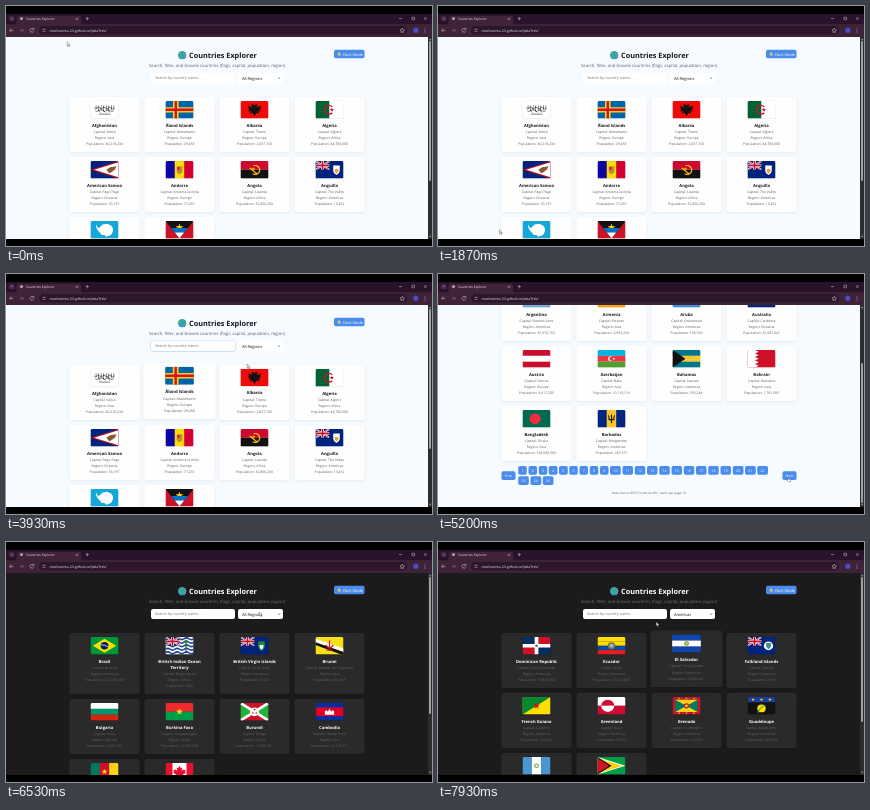
Recreate the animation shown at these times as an HTML page. Size 426 by 240 pixels, loop 8 s.

```html
<!DOCTYPE html>
<html lang="en">
<head>
<meta charset="utf-8">
<title>Countries Explorer</title>
<style>
html, body { margin: 0; width: 100%; height: 100%; overflow: hidden; background: #000; }
body { position: relative; font-family: "Open Sans", "Noto Sans", sans-serif; text-rendering: geometricPrecision; }
svg { display: block; }
#chrome { position: absolute; left: 0; top: 0; }
#view {
  --d: 0%;
  --bg: color-mix(in srgb, #1b1b1b var(--d), #f5fbff);
  --card: color-mix(in srgb, #2a2a2a var(--d), #fefefe);
  --head: color-mix(in srgb, #fff var(--d), #151a20);
  --sub: color-mix(in srgb, #747474 var(--d), #5a6068);
  --dim: color-mix(in srgb, #656565 var(--d), #606060);
  position: absolute; left: 0; top: 31px; width: 426px; height: 202px; overflow: hidden; background: var(--bg);
}
/* The page is laid out at four times its shown size */
#doc { position: absolute; left: 0; top: -.6px; width: 1688px; transform-origin: 0 0; }
#doc > * { position: absolute; white-space: nowrap; }
h1 { left: 732px; top: 52px; margin: 0; font-size: 29.2px; line-height: 48px; color: var(--head); }
.sub { left: 0; width: 1688px; top: 104px; text-align: center; font-size: 17px; line-height: 24px; color: var(--sub); }
.globe { left: 688px; top: 60px; }
.field { box-sizing: border-box; top: 148px; height: 40px; border-radius: 8px; background: #fff;
  padding-left: 16px; font-size: 15.2px; line-height: 40px; color: #757575; }
#search { left: 580px; width: 336px; }
#search.focus { box-shadow: 0 0 0 1.500px #a9d0f5, 0 0 8px #c4e0fa; }
#select { left: 928px; width: 180px; font-size: 16px; font-weight: 500; color: #111; }
#select svg { position: absolute; right: 10px; top: 16px; }
#mode { left: 1312px; top: 55px; width: 122px; height: 34px; border-radius: 7px; background: #4a8cf0; color: #fff;
  font-size: 15.5px; line-height: 34px; text-indent: 36px; }
#mode svg { position: absolute; left: 15px; top: 10px; }
.list { left: 254px; top: 244px; width: 1180px; visibility: hidden; }
.list.on { visibility: visible; }
.grid { display: grid; grid-template-columns: repeat(4, 280px); gap: 20px; }
.card { box-sizing: border-box; padding: 16px 28px 20px; border-radius: 11px; background: var(--card); text-align: center;
  white-space: normal; box-shadow: 0 4px 15px rgba(0, 0, 0, .08); }
.card svg { width: 112px; height: 70px; margin: 0 auto 14px; border-radius: 6px; overflow: hidden; box-shadow: 0 1px 4px rgba(0, 0, 0, .2); }
h3 { margin: 0 0 4px; font-size: 16.6px; line-height: 24px; color: var(--head); }
p { margin: 0 -24px; font-size: 13.8px; line-height: 24px; color: var(--dim); white-space: nowrap; }
.pager { display: flex; justify-content: center; align-items: center; gap: 11px; margin-top: 20px; }
.nums { display: flex; flex-wrap: wrap; gap: 6px 6.6px; }
.pager b { flex: none; box-sizing: border-box; height: 35px; padding: 0 13px; border-radius: 7px; background: #4a8cf0; color: #fff;
  font-size: 14.4px; font-weight: 400; line-height: 35px; text-align: center; }
.pager > b { width: 56px; padding: 0; }
.pager b.off { background: #6d7482; color: #9aa0aa; }
.foot { margin-top: 20px; text-align: center; font-size: 12.2px; line-height: 24px; color: var(--dim); }
#bar { position: absolute; right: 0; top: 0; width: 4.4px; height: 202px; background: #2c2c2c; }
#thumb { position: absolute; left: 1px; width: 2.4px; border-radius: 1.2px; background: #9f9f9f; }
#bar svg { position: absolute; left: 0; top: 0; }
#cursor { position: absolute; left: 0; top: 0; overflow: visible; }
</style>
</head>
<body>
<svg id="chrome" width="426" height="31" font-size="3.6" fill="none" stroke="#d8c9d5" stroke-width=".5">
  <g stroke="none">
    <path fill="#28132a" d="M0 8h426v23H0z"/>
    <path fill="#3f2439" d="M0 18.3h426V31H0zM9 18.3q1.5 0 1.5-1.5v-5q0-2 2-2h60.500q2 0 2 2v5q0 1.500 1.500 1.500z"/>
    <rect x="33" y="20" width="368" height="8.600" rx="4.300" fill="#2b1729"/>
    <rect x="3" y="9.800" width="5.500" height="5.500" rx="1.600" fill="#47284a"/>
    <circle cx="15.500" cy="12.600" r="1.600" fill="#a9a0a8"/>
    <circle cx="409.800" cy="24.300" r="2.600" fill="#4c50c8"/>
    <g fill="#eee2ec">
      <text x="20" y="13.800" font-size="3.300">Countries Explorer</text>
      <text x="43.500" y="25.600">marloventa-23.github.io/JobaTrek/</text>
      <circle cx="419" cy="22.600" r=".45"/><circle cx="419" cy="24.300" r=".45"/><circle cx="419" cy="26" r=".45"/>
    </g>
  </g>
  <path d="M4.800 12l1 1 1-1M70 11.700l2.200 2.200m0-2.200l-2.200 2.200M79.600 12.600h3.400m-1.700-1.700v3.400M393 12.600h3M406 11.300h2.500v2.500H406zM418 11.200l2.700 2.700m0-2.700l-2.700 2.700"/>
  <path d="M7.500 24.300H3.700l1.700-1.700m-1.700 1.700l1.700 1.700M27.600 23.300a1.900 1.900 0 1 0 .2 1.600m0-3v1.500h-1.500M36.500 23.300h3.200m-3.200 2h3.200M396.300 22.200l.7 1.500 1.600.2-1.200 1.100.3 1.600-1.400-.8-1.400.8.300-1.600-1.200-1.100 1.600-.2z"/>
  <path stroke="#927f90" d="M13.500 24.300h3.800l-1.700-1.700m1.700 1.700l-1.700 1.700"/>
</svg>
<div id="view">
  <div id="doc">
    <svg class="globe" width="34" height="34" viewBox="0 0 20 20"><circle cx="10" cy="10" r="10" fill="#2f9be0"/><path fill="#4fae57" d="M2 5q4-5 9-4l-1 4-4 2 1 4 3 2-2 5q-3-1-3-5L1 9zM13 7l5-2q3 5 0 10l-3-1-1-3-2-1z"/></svg>
    <h1>Countries Explorer</h1>
    <div class="sub">Search, filter, and browse countries (flags, capital, population, region)</div>
    <div id="mode"><svg width="14" height="14" viewBox="0 0 10 10"><path fill="#ffd34d" d="M6 0a5 5 0 1 0 4 7A5 5 0 0 1 6 0z"/></svg>Dark Mode</div>
    <div id="search" class="field">Search by country name...</div>
    <div id="select" class="field"><span></span><svg width="12" height="9"><path d="M2 2l4 4 4-4" fill="none" stroke="#111" stroke-width="2.400"/></svg></div>
  </div>
  <div id="bar"><svg width="4.400" height="202"><path fill="#9f9f9f" d="M1 3.200l1.200-1.800 1.200 1.800zM1 198.800l1.200 1.800 1.200-1.800z"/></svg><div id="thumb"></div></div>
</div>
<svg id="cursor" width="6" height="8" stroke="#333" stroke-width=".4" fill="#fff" stroke-linejoin="round">
  <path id="arrow" d="M0 0v4l1-.9.7 1.600.7-.3-.7-1.500h1.300z"/>
  <path id="hand" d="M.7 2.500V.500q.4-.6.800 0V2l1.800.5q.4.200.3.700l-.4 1.600H1.200L-.2 3q.3-.6.900.1z"/>
</svg>
<script>
const $ = id => document.getElementById(id);

// Flag pieces on a 30 x 20 field
const R = (c, x = 0, y = 0, w = 30, h = 20) => `<rect x="${x}" y="${y}" width="${w}" height="${h}" fill="${c}"/>`;
const C = (c, x, y, r) => `<circle cx="${x}" cy="${y}" r="${r}" fill="${c}"/>`;
const P = (c, d) => `<path fill="${c}" d="${d}"/>`;
const L = (c, w, d) => `<path fill="none" stroke="${c}" stroke-width="${w}" d="${d}"/>`;
const S = (c, x, y, r) => P(c, 'M' + Array.from({ length: 10 }, (_, i) => {
  const a = i * Math.PI / 5, q = i % 2 ? r * .4 : r;
  return (x + q * Math.sin(a)).toFixed(1) + ' ' + (y - q * Math.cos(a)).toFixed(1);
}).join('L') + 'z');
const H = (...cs) => cs.map((c, i) => R(c, 0, i * 20 / cs.length, 30, 20 / cs.length + .05)).join('');
const V = (...cs) => cs.map((c, i) => R(c, i * 30 / cs.length, 0, 30 / cs.length + .05, 20)).join('');
const cross = (c, w, x = 15) => L(c, w, `M${x} 0V20M0 10H30`);
const moon = (c, bg, x, y, r) => C(c, x, y, r) + C(bg, x + r * .35, y, r * .8);
const X = 'M0 0L30 20M30 0L0 20';
const uk = `<svg width="15" height="10" viewBox="0 0 30 20">${R('#012169') + L('#fff', 4, X) + L('#c8102e', 1.500, X) + cross('#fff', 6.500) + cross('#c8102e', 3.800)}</svg>`;
const shield = (a, b) => P(a, 'M19 5h7v6q0 3-3.500 5-3.500-2-3.500-5z') + P(b, 'M20.500 9h4v2.500q0 1.500-2 3-2-1.500-2-3z');
const ensign = (c, mark) => R(c) + uk + mark;
const red = '#ce1126', blue = '#00247d', gold = '#fcd116', green = '#0a8a43', white = '#fff', black = '#111';

// name | capital | region | population, with its flag
const countries = [
  ['Afghanistan|Kabul|Asia|40,218,234', R(white) + L(black, .6, 'M4 8q1.500 2 3 0t3 0 3 0 3 0 3 0 3 0 3 0M5 11q2 2 4 0t4 0 4 0 4 0 4 0M6 5v4m2.500-4v6m3-6v5m2.500-5v6m3-6v5m2.500-5v6m3-6v5m2.500-5v5M8 10l3 3m2-3l3 3m2-3l3 3M9 15h12')],
  ['Åland Islands|Mariehamn|Europe|29,458', R('#0064ad') + cross('#ffd300', 6, 11) + cross('#d21034', 2.600, 11)],
  ['Albania|Tirana|Europe|2,837,743', R('#f00a0a') + P(black, 'M15 5l-2-2-2 2 2 1-1 1-4-2 1 3-1 1 2 1-2 2 3-.5-1 3 3-1 2 4 2-4 3 1-1-3 3 .5-2-2 2-1-1-1 1-3-4 2-1-1 2-1-2-2z')],
  ['Algeria|Algiers|Africa|44,700,000', V('#006233', white) + L('#d21034', 1.500, 'M18 6.500a5 5 0 1 0 0 7') + S('#d21034', 17.500, 10, 2.500)],
  ['American Samoa|Pago Pago|Oceania|55,197', R(blue) + P('#bd1021', 'M30 0L0 10 30 20z') + P(white, 'M30 1.500L4 10l26 8.500z') + P('#8a5a2b', 'M17 10l4-3 7-1-2 4-4 3-2 1z')],
  ['Andorra|Andorra la Vella|Europe|77,265', V('#10069f', '#fedd00', '#d50032') + P('#c08a3a', 'M12 6h6v6q0 2-3 3-3-1-3-3z') + R('#d50032', 13, 7, 2, 3)],
  ['Angola|Luanda|Africa|32,866,268', H('#cc092f', black) + L('#ffcb00', 1.300, 'M14 5.500a5 5 0 1 1-1 9M10 8l8 7') + S('#ffcb00', 14, 9, 2)],
  ['Anguilla|The Valley|Americas|13,452', ensign(blue, shield(white, '#f3a033'))],
  ['Antarctica|N/A|Antarctic|1,000', R('#12a9da') + P(white, 'M6 4l2 4 2-1 3-3 5-1 4 2 2 3 0 4-2 4-5 2-2-2-3 0-2-3-2-2-2-4z')],
  ['Antigua and Barbuda|Saint John\'s|Americas|97,928', R(red) + P(black, 'M0 0h30L15 20z') + S(gold, 15, 7.500, 4.500) + P('#0072c6', 'M6 8h18l-4 5.500H10z') + P(white, 'M10 13h10l-5 7z')],
  ['Argentina|Buenos Aires|Americas|45,376,763', H('#74acdf', white, '#74acdf') + C('#f6b40e', 15, 10, 2.200)],
  ['Armenia|Yerevan|Asia|2,963,234', H('#d90012', '#0033a0', '#f2a800')],
  ['Aruba|Oranjestad|Americas|106,766', R('#418fde') + R('#ffd100', 0, 12.500, 30, 1.300) + R('#ffd100', 0, 15.500, 30, 1.300) + S(white, 6, 5, 3.500) + S(red, 6, 5, 2.600)],
  ['Australia|Canberra|Oceania|25,687,041', ensign(blue, S(white, 7.500, 15, 2.500) + S(white, 22, 4, 1.500) + S(white, 19, 9, 1.500) + S(white, 26, 8, 1.500) + S(white, 22, 16, 1.500))],
  ['Austria|Vienna|Europe|8,917,205', H('#c8102e', white, '#c8102e')],
  ['Azerbaijan|Baku|Asia|10,110,116', H('#00b5e2', '#ef3340', '#509e2f') + moon(white, '#ef3340', 14, 10, 2.800) + S(white, 17.500, 10, 1.600)],
  ['Bahamas|Nassau|Americas|393,248', H('#00778b', '#ffc72c', '#00778b') + P(black, 'M0 0l14 10L0 20z')],
  ['Bahrain|Manama|Asia|1,701,583', R(red) + P(white, 'M0 0h8l4 2-4 2 4 2-4 2 4 2-4 2 4 2-4 2 4 2-4 2H0z')],
  ['Bangladesh|Dhaka|Asia|164,689,383', R('#006a4e') + C('#f42a41', 13.500, 10, 6)],
  ['Barbados|Bridgetown|Americas|287,371', V('#00267f', '#ffc726', '#00267f') + L(black, 1.200, 'M15 5v10M11.500 6q1 1 1 5h5q0-4 1-5')],
  ['Belarus|Minsk|Europe|9,398,861', R(red) + R(green, 0, 13, 30, 7) + R('#e9b5b5', 0, 0, 3.500)],
  ['Belgium|Brussels|Europe|11,555,997', V(black, '#fae042', '#ed2939')],
  ['Belize|Belmopan|Americas|397,621', R('#171696') + R('#d90f19', 0, 0, 30, 2) + R('#d90f19', 0, 18, 30, 2) + C(white, 15, 10, 6.500) + C('#4d8a3c', 15, 10, 5.600) + C(white, 15, 10, 4.800) + P('#3f7fc0', 'M12.500 8h5v3l-2.500 3-2.500-3z')],
  ['Benin|Porto-Novo|Africa|12,123,198', H(gold, '#e8112d') + R('#008751', 0, 0, 12)],
  ['Bermuda|Hamilton|Americas|63,903', ensign('#cf142b', shield(white, '#b0302a'))],
  ['Bhutan|Thimphu|Asia|771,612', R('#ff4e12') + P('#ffd520', 'M0 0h30L0 20z') + L(white, 2, 'M7 15q4-6 7-4t8-7')],
  ['Bolivia|Sucre|Americas|11,673,029', H('#d52b1e', '#f9e300', '#007934') + C('#8a6a2a', 15, 10, 2.600) + C('#4aa0c8', 15, 10, 1.300)],
  ['Bosnia and Herzegovina|Sarajevo|Europe|3,280,815', R('#002395') + P('#fecb00', 'M9 0h17v20z') + L(white, 1.300, 'M6 0l16 20')],
  ['Botswana|Gaborone|Africa|2,351,625', R('#75aadb') + R(white, 0, 7, 30, 6) + R(black, 0, 8, 30, 4)],
  ['Bouvet Island|N/A|Antarctic|0', R('#ba0c2f') + cross(white, 5, 11) + cross('#00205b', 2.500, 11)],
  ['Brazil|Brasília|Americas|212,559,409', R('#009739') + P('#fedd00', 'M15 2l12.500 8L15 18 2.500 10z') + C('#012169', 15, 10, 4.200) + L(white, .8, 'M11 9q4-.6 8 2.500')],
  ['British Indian Ocean Territory|Diego Garcia|Africa|3,000', R(white) + [2, 6, 10, 14, 18].map(y => L('#1c3f94', 1.800, `M0 ${y}q2.500-2 5 0t5 0 5 0 5 0 5 0 5 0`)).join('') + uk + L('#2d7a3a', 1.500, 'M22 5v11M19 6l3-2 3 2')],
  ['British Virgin Islands|Road Town|Americas|30,237', ensign(blue, shield('#1f8a3b', white))],
  ['Brunei|Bandar Seri Begawan|Asia|437,483', R('#f7e017') + P(white, 'M0 2l30 11v4L0 6z') + P(black, 'M0 6l30 11v4L0 9z') + L('#cf1126', 1.300, 'M15 4v10M11 9q4 7 8 0M12 15h6')],
  ['Bulgaria|Sofia|Europe|6,927,288', H(white, '#00966e', '#d62612')],
  ['Burkina Faso|Ouagadougou|Africa|20,903,278', H('#ef2b2d', '#009e49') + S(gold, 15, 10, 4)],
  ['Burundi|Gitega|Africa|11,890,781', R('#ce1126') + P('#1eb53a', 'M0 0l15 10L0 20zM30 0L15 10l15 10z') + L(white, 3, X) + C(white, 15, 10, 5) + S(red, 15, 7.700, 1.500) + S(red, 13, 11.500, 1.500) + S(red, 17, 11.500, 1.500)],
  ['Cambodia|Phnom Penh|Asia|16,718,971', R('#032ea1') + R('#e00025', 0, 5, 30, 10) + P(white, 'M10 13.500v-4l1.500-1.500 1 1.500h1l1.500-3 1.500 3h1l1-1.500 1.500 1.500v4z')],
  ['Cameroon|Yaoundé|Africa|26,545,864', V('#007a5e', red, gold) + S(gold, 15, 10, 3.500)],
  ['Canada|Ottawa|Americas|38,005,238', R('#e8112d') + R(white, 7.500, 0, 15) + P('#e8112d', 'M15 3l-1.500 3-1.500-1 .7 4-2-2-.5 1-2 0 1 2-1 1 4 3-.5 1.500 3-.5v3h.6v-3l3 .5-.5-1.500 4-3-1-1 1-2-2 0-.5-1-2 2 .7-4-1.500 1z')],
  ['Caribbean Netherlands|Kralendijk|Americas|25,987', H('#ae1c28', white, '#21468b')],
  ['Cayman Islands|George Town|Americas|65,720', ensign(blue, shield(white, '#2a9ad0'))],
  ['Chile|Santiago|Americas|19,116,209', H(white, '#d52b1e') + R('#0039a6', 0, 0, 10, 10) + S(white, 5, 5, 2.800)],
  ['Colombia|Bogotá|Americas|50,882,884', H(gold, gold, '#003893', red)],
  ['Costa Rica|San José|Americas|5,094,114', H('#002b7f', white, red, red, white, '#002b7f')],
  ['Cuba|Havana|Americas|11,326,616', H('#002a8f', white, '#002a8f', white, '#002a8f') + P('#cf142b', 'M0 0l15 10L0 20z') + S(white, 5, 10, 3)],
  ['Curaçao|Willemstad|Americas|155,014', R('#002b7f') + R('#f9e814', 0, 12.500, 30, 2.500) + S(white, 5, 4, 1.800) + S(white, 9, 7, 2.500)],
  ['Dominica|Roseau|Americas|71,991', R('#006b3f') + cross(gold, 4) + cross(black, 2.500) + cross(white, 1.200) + C('#d41c30', 15, 10, 5) + C('#4b8b3b', 15, 10, 2)],
  ['Dominican Republic|Santo Domingo|Americas|10,847,904', R('#002d62') + R(red, 15, 0, 15, 10) + R(red, 0, 10, 15, 10) + cross(white, 4) + C('#4b7a4b', 15, 10, 1.500)],
  ['Ecuador|Quito|Americas|17,643,060', H('#ffdd00', '#ffdd00', '#034ea2', '#ed1c24') + C('#8a6a3a', 15, 10, 4) + C('#7fc0dc', 15, 10, 2.200)],
  ['El Salvador|San Salvador|Americas|6,486,201', H('#0f47af', white, '#0f47af') + C('#5c9a4f', 15, 10, 2.500) + C('#e4d060', 15, 10, 1.400)],
  ['Falkland Islands|Stanley|Americas|2,563', ensign(blue, C(white, 22.500, 10, 5) + P('#3b86c4', 'M20 7h5v4l-2.500 3-2.500-3z') + R('#4f9a4a', 20, 7, 5, 2.500))],
  ['French Guiana|Cayenne|Americas|254,541', R('#ffde00') + P('#078930', 'M0 0h30L0 20z') + S('#da121a', 15, 10, 4)],
  ['Greenland|Nuuk|Americas|56,367', H(white, '#d00c33') + P('#d00c33', 'M4 10a7 7 0 0 1 14 0z') + P(white, 'M4 10a7 7 0 0 0 14 0z')],
  ['Grenada|St. George\'s|Americas|112,519', R('#ce1126') + R('#007a5e', 3, 3, 24, 14) + P(gold, 'M3 3h24L3 17h24z') + C('#ce1126', 15, 10, 3) + S(gold, 15, 10, 2.600) + [7, 15, 23].map(x => S(gold, x, 1.500, 1.300) + S(gold, x, 18.500, 1.300)).join('')],
  ['Guadeloupe|Basse-Terre|Americas|400,132', R(black) + R('#1b3f9c', 0, 0, 30, 6) + [6, 15, 24].map(x => S(gold, x, 3, 2)).join('') + C('#ffdd00', 15, 13, 4.500) + L('#3c9a3c', 1.200, 'M11 18q2-6 8-9')],
  ['Guatemala|Guatemala City|Americas|16,858,333', V('#4997d0', white, '#4997d0') + C('#6a9a56', 15, 10, 2.600) + C(white, 15, 10, 1.400)],
  ['Guyana|Georgetown|Americas|786,559', R('#009e49') + P(white, 'M0 0l30 10L0 20z') + P(gold, 'M0 1l27 9-27 9z') + P(black, 'M0 0l15 10L0 20z') + P(red, 'M0 1.500L12.500 10 0 18.500z')],
];

function cardHtml([text, flag]) {
  const [name, capital, region, population] = text.split('|');
  return `<div class="card"><svg viewBox="0 0 30 20" preserveAspectRatio="none">${flag}</svg><h3>${name}</h3>
    <p>Capital: ${capital}</p><p>Region: ${region}</p><p>Population: ${population}</p></div>`;
}

function addPage(items, number, total) {
  const list = document.createElement('div');
  const nums = Array.from({ length: total }, (_, i) => `<b>${i + 1}</b>`).join('');
  list.className = 'list';
  list.innerHTML = `<div class="grid">${items.map(cardHtml).join('')}</div>
    <div class="pager"><b class="${number ? '' : 'off'}">Prev</b><div class="nums">${nums}</div><b>Next</b></div>
    <div class="foot">Data source: REST Countries API • Items per page: 10</div>`;
  $('doc').append(list);
  return { list, cards: [...list.querySelectorAll('.card')] };
}

const americas = countries.filter(c => c[0].includes('|Americas|'));
const pages = [0, 1, 2, 3].map(n => addPage(countries.slice(n * 10, n * 10 + 10), n, 25))
  .concat([0, 1, 2].map(n => addPage(americas.slice(n * 10, n * 10 + 10), n, 6)));
const maxScroll = [79, 79, 79, 85, 69, 69, 69];

// Timeline: [ms, values...]
const cursorPath = [[0, 62, 38], [270, 62, 38], [1870, 62, 226], [2350, 170, 92], [2520, 185, 72], [2850, 185, 72], [3100, 110, 115],
  [3450, 168, 125], [3880, 205, 94], [3900, 212, 86], [3930, 242, 92], [4050, 246, 112], [4500, 350, 205], [5440, 350, 205],
  [5930, 327, 37], [6030, 343, 48], [6130, 343, 48], [6320, 254, 72], [6560, 254, 72], [6800, 231, 148], [7190, 231, 148],
  [7330, 251, 206], [7500, 251, 206], [7760, 240, 124], [7880, 226, 104], [7930, 219, 82], [8000, 219, 82]];
const scrollPath = [[0, 0], [4080, 0], [4480, 79], [5440, 79], [5800, 0], [6800, 0], [7130, 61], [7173, 69], [7510, 69], [7790, 0], [8000, 0]];
const pageTurns = [4650, 5270, 5390, 6540, 7390, 7480];
const darkAt = 6070;

function along(path, t) {
  const i = Math.max(1, path.findIndex(k => k[0] >= t));
  const a = path[i - 1], b = path[i];
  const f = Math.min(1, Math.max(0, (t - a[0]) / (b[0] - a[0])));
  return a.slice(1).map((v, j) => v + (b[j + 1] - v) * f);
}
const pageAt = t => pageTurns.filter(p => p <= t).length;

function hovered(t) {
  const [x, y] = along(cursorPath, t), [scroll] = along(scrollPath, t);
  const col = (x - 63.5) / 75, row = (y + scroll - 91.4) / 60;
  const inside = col >= 0 && col < 4 && row >= 0 && col % 1 < .933 && row % 1 < .917;
  return inside ? Math.floor(row) * 4 + Math.floor(col) : -1;
}

// Lift is the share of the last 150 ms spent over the card
function lifts(t) {
  const sums = Array(10).fill(0), steps = 25;
  for (let k = 0; k < steps; k++) {
    const past = Math.max(0, t - k * 6), i = hovered(past);
    if (i >= 0 && i < 10 && pageAt(past) === pageAt(t)) sums[i] += 1 / steps;
  }
  return sums;
}

function render(t) {
  const page = pageAt(t), [scroll] = along(scrollPath, t), [x, y] = along(cursorPath, t);
  const room = maxScroll[page], thumb = 194 * 203 / (203 + room);
  pages.forEach((p, i) => p.list.classList.toggle('on', i === page));
  lifts(t).forEach((raw, i) => {
    const l = raw * (2 - raw);
    pages[page].cards[i].style.transform = l ? `translateY(${-7.2 * l}px) scale(${1 + .03 * l})` : '';
  });
  $('doc').style.transform = `translateY(${-scroll}px) scale(.25)`;
  $('thumb').style.cssText = `height:${thumb}px;top:${4 + (194 - thumb) * scroll / room}px`;
  $('view').style.setProperty('--d', Math.min(1, Math.max(0, (t - darkAt) / 120)) * 100 + '%');
  $('search').classList.toggle('focus', t > 2560 && t < 4650);
  $('select').firstChild.textContent = page > 3 ? 'Americas' : 'All Regions';
  const onNext = (t > 4450 && t < 5480) || (t > 7310 && t < 7530);
  const pointing = onNext || (t > 6000 && t < 6150);
  $('arrow').style.display = pointing ? 'none' : '';
  $('hand').style.display = pointing ? '' : 'none';
  $('cursor').style.transform = `translate(${x - .8}px,${y - 2}px)`;
}

function frame() {
  render(performance.now() % 8000);
  requestAnimationFrame(frame);
}
frame();
</script>
</body>
</html>
```
